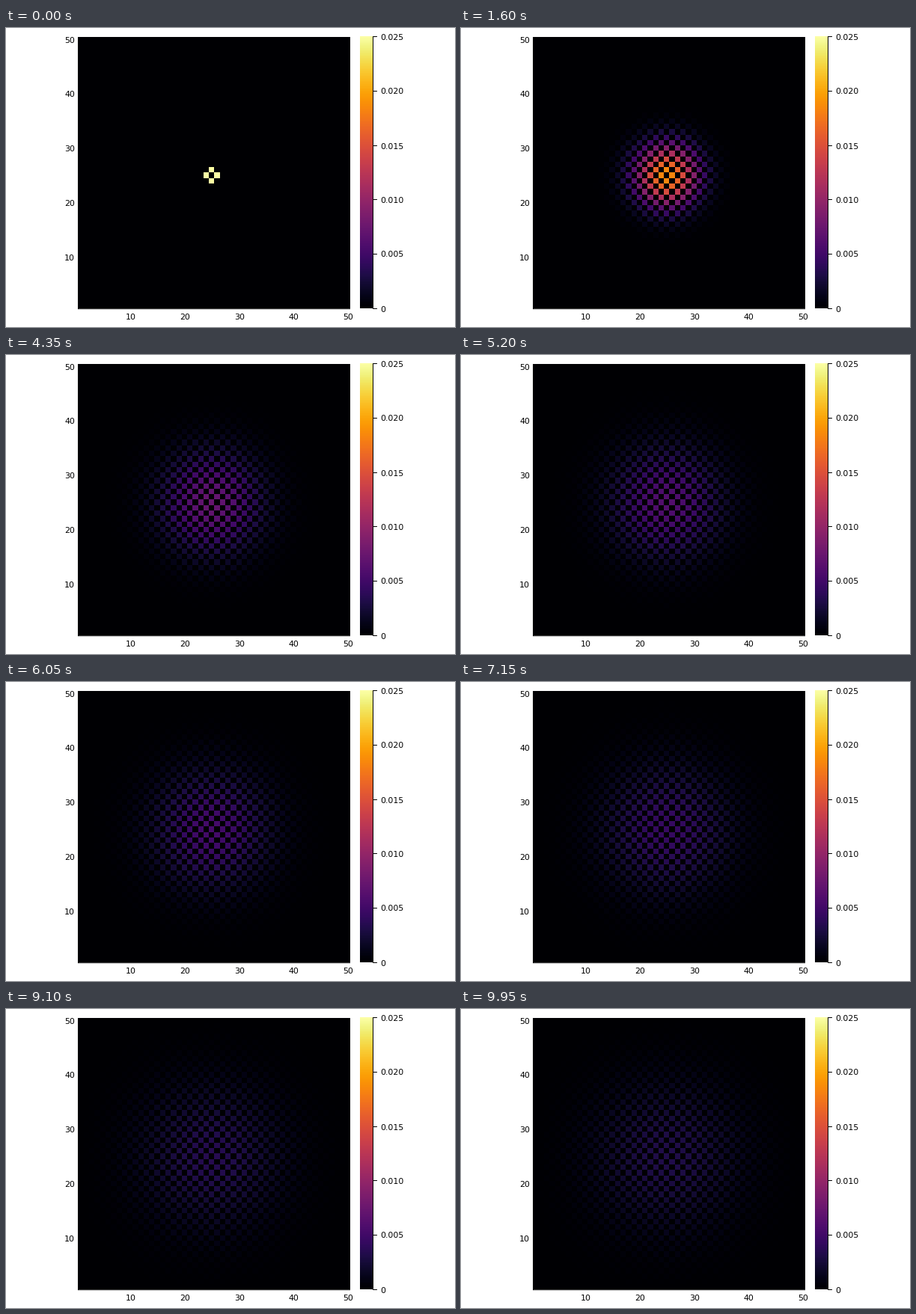
Write a matplotlib script that moves like this. It is 600 by 400 pixels and loops after 10 s.

```python
import numpy as np
import matplotlib.pyplot as plt
from matplotlib.animation import FuncAnimation

W, H, DPI = 600, 400, 100
N, FRAMES = 50, 200
VMAX = 0.025
LEFT, BOTTOM, CELL = 96.6, 375.33, 7.275   # heatmap placement in pixels
X0, X1, Y0, Y1 = 97, 460, 12, 375          # pixel box of the heatmap
FONT = dict(family="DejaVu Sans", fontsize=11 * 72 / DPI, color="black",
            va="baseline")


def walk_steps():
    """Probability of a lattice walker on an N x N grid, step by step."""
    p = np.zeros((N + 2, N + 2))
    p[25, 25] = 1
    steps = []
    for _ in range(FRAMES):
        q = np.zeros_like(p)
        q[1:-1, 1:-1] = (p[:-2, 1:-1] + p[2:, 1:-1]
                         + p[1:-1, :-2] + p[1:-1, 2:]) / 4
        p = q
        steps.append(p[1:-1, 1:-1])
    return steps


steps = walk_steps()

# Grid cell under the centre of each pixel column and row
cols = np.clip(((np.arange(X0, X1) + 0.5 - LEFT) // CELL).astype(int), 0, N - 1)
rows = np.clip(((BOTTOM - np.arange(Y0, Y1) - 0.5) // CELL).astype(int), 0, N - 1)


def pixels(i):
    return steps[i][np.ix_(rows, cols)]


fig = plt.figure(figsize=(W / DPI, H / DPI), dpi=DPI, facecolor="white")
ax = fig.add_axes([0, 0, 1, 1])
ax.axis("off")


def line(xs, ys):
    ax.plot(xs, ys, color="black", lw=72 / DPI, solid_capstyle="butt",
            snap=False, zorder=3)


style = dict(cmap="inferno", vmin=0, interpolation="nearest", aspect="auto")
heat = ax.imshow(pixels(0), vmax=VMAX, extent=(X0, X1, Y1, Y0), **style)

# Axes of the heatmap
line([96.5, 96.5], [12, 376])
line([96, 460], [375.7, 375.7])
for v in range(10, N + 1, 10):
    offset = (v - 0.5) * CELL
    ax.text(LEFT + offset + 0.8, 390, str(v), ha="center", **FONT)
    ax.text(92, BOTTOM - offset + 4.4, str(v), ha="right", **FONT)

# Colour bar
ramp = np.linspace(1, 0, Y1 + 1 - Y0)[:, None]
ax.imshow(ramp, vmax=1, extent=(473, 490, Y1, Y0 - 1), **style)
line([490.5, 490.5], [11, 376])
for k in range(6):
    y = 375.5 - k * 72.8
    y = np.floor(y) + 0.5
    line([491, 496], [y, y])
    label = f"{k * 0.005:.3f}" if k else "0"
    ax.text(500, y + 4, label, ha="left", **FONT)

ax.set_xlim(0, W)
ax.set_ylim(H, 0)


def draw(i):
    heat.set_data(pixels(i))
    return [heat]


anim = FuncAnimation(fig, draw, frames=FRAMES, interval=50, repeat=True,
                     repeat_delay=0, blit=False)
plt.show()
```
